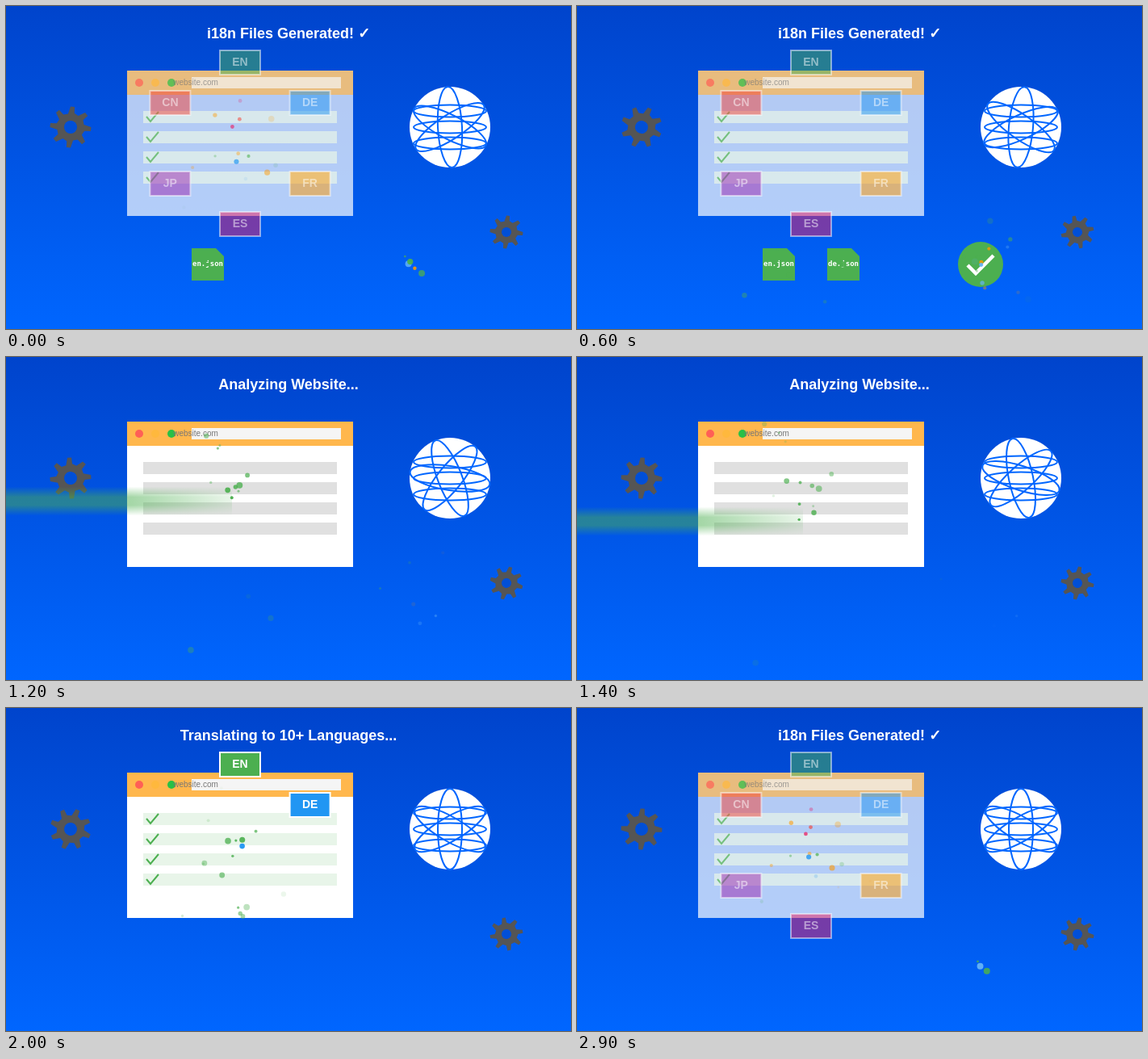
These frames come from a looping animation (700x400 px, 3 s). An HTML page with a canvas:

```html
<!DOCTYPE html>
<html lang="en">
<head>
<meta charset="utf-8">
<title>i18n generator</title>
<style>
html, body { margin: 0; height: 100%; overflow: hidden; }
canvas { display: block; }
</style>
</head>
<body>
<canvas id="stage" width="700" height="400"></canvas>
<script>
const ctx = document.getElementById('stage').getContext('2d');
const LOOP = 3000, ANALYZE = 690, TRANSLATE = 1760, GENERATE = 2740;
const LABEL_STEP = 165, LIFE = 850;
const GREEN = '#4caf50', BLUE = '#2196f3', ORANGE = '#ff9800';
const TAU = Math.PI * 2;
const LABELS = [
  ['EN', GREEN], ['DE', BLUE], ['FR', ORANGE],
  ['ES', '#e91e63'], ['JP', '#9c27b0'], ['CN', '#f44336']
];
// [time, degrees] of the globe's meridians; the pattern repeats every 60 degrees
const GLOBE_TURN = [[0, -3], [600, 5], [900, 25], [1400, 48], [2000, 60], [2400, 52], [2900, 60], [3000, 57]];

const sky = ctx.createLinearGradient(0, 0, 0, 400);
sky.addColorStop(0, '#0044cc');
sky.addColorStop(1, '#0066ff');
const beamFill = ctx.createLinearGradient(0, 0, 280, 0);
beamFill.addColorStop(0, 'rgba(76,175,80,.5)');
beamFill.addColorStop(.55, 'rgba(76,175,80,.5)');
beamFill.addColorStop(1, 'rgba(76,175,80,.12)');

const beamY = t => 110 + .126 * (t - 663);

function rect(x, y, w, h, color) {
  ctx.fillStyle = color;
  ctx.fillRect(x, y, w, h);
}

function disc(x, y, r, color) {
  ctx.fillStyle = color;
  ctx.beginPath();
  ctx.arc(x, y, r, 0, TAU);
  ctx.fill();
}

function path(points) {
  ctx.beginPath();
  points.forEach(([x, y]) => ctx.lineTo(x, y));
}

function line(points, color, width) {
  path(points);
  ctx.strokeStyle = color;
  ctx.lineWidth = width;
  ctx.stroke();
}

function text(str, x, y, font, color = '#fff') {
  ctx.font = font;
  ctx.fillStyle = color;
  ctx.textAlign = 'center';
  ctx.fillText(str, x, y);
}

function keyed(keys, t) {
  const i = keys.findIndex(k => k[0] > t);
  const [t0, a] = keys[i - 1], [t1, b] = keys[i];
  return a + (b - a) * (t - t0) / (t1 - t0);
}

function seeded(seed) {
  return () => {
    seed = (seed * 1664525 + 1013904223) % 4294967296;
    return seed / 4294967296;
  };
}

function makeParticles() {
  const random = seeded(18), list = [];
  const emit = (born, x, y, color) => list.push({
    born, x, y, color,
    vx: (random() - .5) * .2,
    vy: (random() - .5) * .2,
    r: 1.3 + random() * 2.7
  });
  for (let t = ANALYZE; t < TRANSLATE; t += 55) emit(t, 280, beamY(t), GREEN);
  for (let t = TRANSLATE; t < GENERATE; t += 42) {
    const shown = Math.min(6, 1 + Math.floor((t - TRANSLATE) / LABEL_STEP));
    emit(t, 290, 170, LABELS[Math.floor(random() * shown)][1]);
  }
  for (let t = GENERATE; t < LOOP + ANALYZE; t += 55)
    emit(t, 500, 320, [GREEN, '#64b5f6', ORANGE][Math.floor(random() * 3)]);
  for (let t = LOOP; t < LOOP + ANALYZE; t += 110)
    emit(t, t > LOOP + 350 && random() < .5 ? 330 : 250, 320, GREEN);
  return list;
}
const particles = makeParticles();

function drawParticles(t) {
  for (const p of particles) {
    const age = (t - p.born + 2 * LOOP) % LOOP;
    if (age > LIFE) continue;
    ctx.globalAlpha = 1 - age / LIFE;
    disc(p.x + p.vx * age, p.y + p.vy * age, p.r, p.color);
  }
  ctx.globalAlpha = 1;
}

function drawGear(x, y, r, hole, angle) {
  ctx.save();
  ctx.translate(x, y);
  ctx.rotate(angle);
  const points = [];
  for (let i = 0; i < 8; i++)
    for (const [turn, k] of [[0, 1], [.2, 1], [.27, .7], [.6, .66]]) {
      const a = i * TAU / 8 + turn;
      points.push([Math.cos(a) * r * k, Math.sin(a) * r * k]);
    }
  path(points);
  ctx.fillStyle = '#555';
  ctx.fill();
  disc(0, 0, hole, '#004fd8');
  ctx.restore();
}

function drawGlobe(t) {
  disc(550, 150, 50, '#fff');
  ctx.strokeStyle = '#0066ff';
  ctx.lineWidth = 2;
  const ring = (y, rx, ry, angle) => {
    ctx.beginPath();
    ctx.ellipse(550, y, rx, ry, angle, 0, TAU);
    ctx.stroke();
  };
  for (const y of [130, 150, 170]) ring(y, 45, 7.5, 0);
  for (const a of [0, 60, 120]) ring(150, 15, 50, (keyed(GLOBE_TURN, t) + a) * Math.PI / 180);
}

function drawWindow(checked) {
  rect(150, 80, 280, 180, '#fff');
  rect(150, 80, 280, 30, '#ffb74d');
  ['#ff5f56', '#ffb83d', '#28c046'].forEach((c, i) => disc(165 + i * 20, 95, 5, c));
  rect(230, 88, 185, 14, '#f5f5f5');
  text('website.com', 235, 98, '10px "Liberation Sans", Arial, sans-serif', '#777');
  for (let y = 130; y < 220; y += 25) {
    rect(170, y, 240, 15, checked ? '#e8f5e9' : '#e0e0e0');
    if (checked) line([[174, y + 7], [179, y + 13], [189, y + 1]], GREEN, 2);
  }
}

function drawBeam(t) {
  const y = beamY(t);
  for (let d = -18; d <= 18; d++) {
    ctx.globalAlpha = Math.min(1, (18 - Math.abs(d)) / 13);
    rect(0, Math.round(y + d), 280, 1, beamFill);
  }
  ctx.globalAlpha = 1;
}

function drawLabel([name, color], i) {
  const a = i * TAU / 6 - TAU / 4;
  const x = 290 + 100 * Math.cos(a), y = 170 + 100 * Math.sin(a);
  rect(x - 25, y - 15, 50, 30, color);
  ctx.strokeStyle = '#fff';
  ctx.lineWidth = 2;
  ctx.strokeRect(x - 25, y - 15, 50, 30);
  text(name, x, y + 4, 'bold 14px "Liberation Sans", Arial, sans-serif');
}

function drawFile(name, x) {
  path([[x, 300], [x + 30, 300], [x + 40, 310], [x + 40, 340], [x, 340]]);
  ctx.fillStyle = GREEN;
  ctx.fill();
  text(name, x + 20, 322, 'bold 9px "DejaVu Sans Mono", monospace');
}

function drawDone(scale) {
  ctx.save();
  ctx.translate(500, 320);
  ctx.scale(scale, scale);
  disc(0, 0, 28, GREEN);
  line([[-16, 1], [-6, 11], [16, -11]], '#fff', 4.5);
  ctx.restore();
}

function draw(t) {
  const generated = t < ANALYZE || t >= GENERATE;
  const analyzing = !generated && t < TRANSLATE;
  rect(0, 0, 700, 400, sky);
  drawGear(80, 150, 25.5, 8, t / LOOP * TAU / 4);
  drawGear(620, 280, 20.5, 6, -t / LOOP * TAU / 4);
  drawGlobe(t);

  ctx.globalAlpha = generated ? .7 : 1;
  drawWindow(!analyzing);
  ctx.globalAlpha = 1;
  if (analyzing) {
    drawBeam(t);
  } else {
    const shown = generated ? 6 : 1 + Math.floor((t - TRANSLATE) / LABEL_STEP);
    ctx.globalAlpha = generated ? .5 : 1;
    LABELS.slice(0, shown).forEach(drawLabel);
    ctx.globalAlpha = 1;
  }

  if (t < ANALYZE || t >= 2950) drawFile('en.json', 230);
  if (t >= 350 && t < ANALYZE) drawFile('de.json', 310);
  if (t > 300 && t < ANALYZE) drawDone(Math.min(1, (t - 300) / 250));
  drawParticles(t);

  const title = generated ? 'i18n Files Generated! ✓'
    : analyzing ? 'Analyzing Website...' : 'Translating to 10+ Languages...';
  text(title, 350, 40, 'bold 18px "Liberation Sans", Arial, sans-serif');
}

function tick() {
  draw(performance.now() % LOOP);
  requestAnimationFrame(tick);
}
tick();
</script>
</body>
</html>
```
